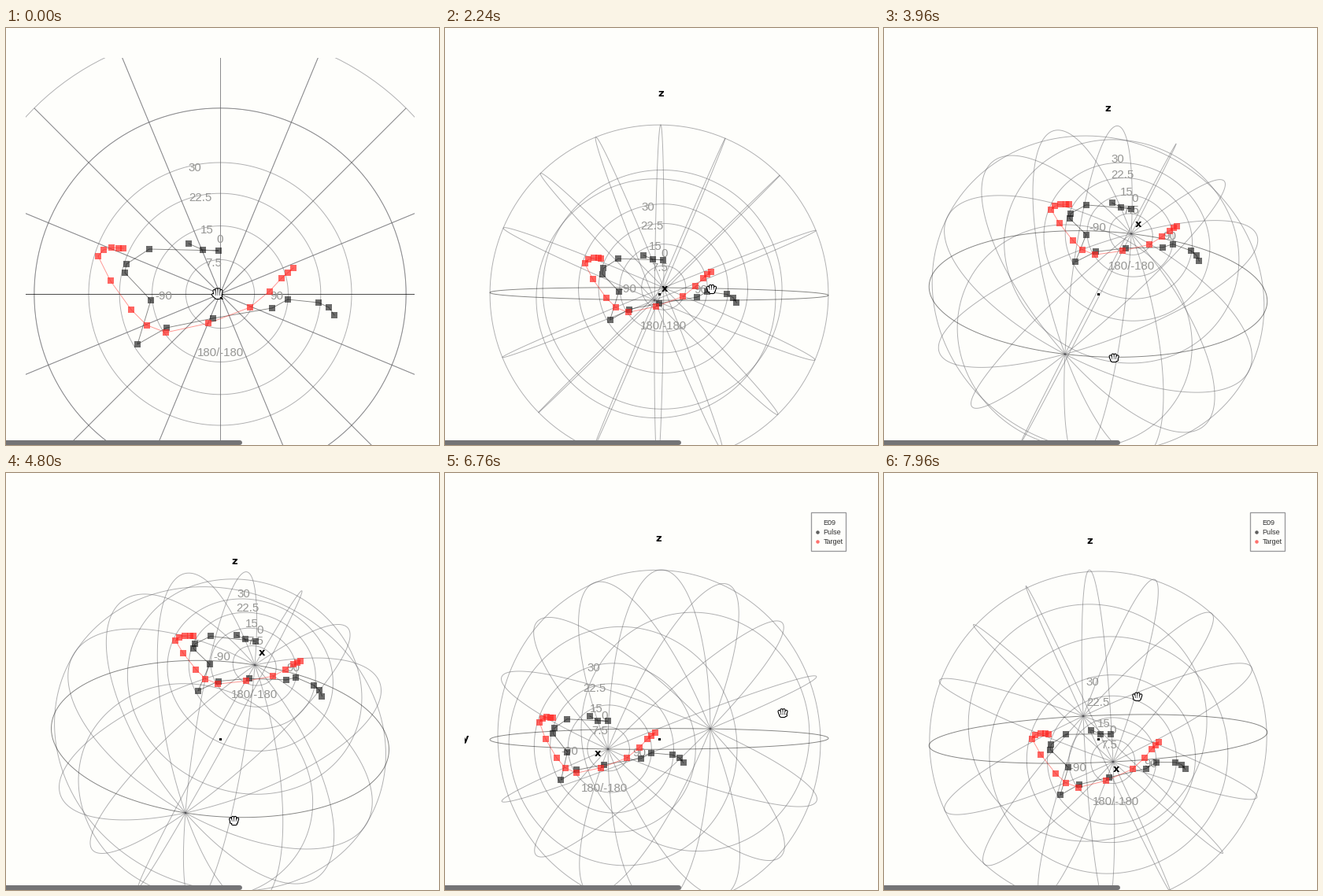
A matplotlib script that plays this animation: 550 px wide and 530 px high, repeating every 8000 ms.

```python
import numpy as np
import matplotlib.pyplot as plt
from matplotlib.animation import FuncAnimation
from matplotlib.collections import LineCollection
from matplotlib.patches import Rectangle

W, H, DPI = 550, 530, 100
STEP, FRAMES = 40, 200
CENTER = np.array([272.0, 338.0])
R_START, R_END = 334, 215
ZOOM_END, GRAB_AT, LEGEND_AT = 840, 1600, 6320
GRAB = np.array([346.0, 321.0])
DRAG = 275          # pointer travel per unit of axis travel
LABEL_R = 1.09      # labels float just above the sphere
PT = 72 / DPI

BG = "#fefefb"
GREY = (0.38, 0.38, 0.40)
INK = (0.04, 0.04, 0.04)
RED = (1.0, 0.15, 0.13)
LABEL = "#969694"

# time, x-axis tip (right, up), lean of the z axis
VIEW = np.array([
    [GRAB_AT, 0, 0, 0],
    [2240, 0.027, 0.037, 0.008],
    [3000, 0.167, 0.181, 0.023],
    [4800, 0.205, 0.437, 0.070],
    [5880, -0.344, 0.205, 0.116],
    [6760, -0.302, -0.060, -0.004],
    [7960, 0.088, -0.135, -0.040],
])

PULSE = [(232, 274), (250, 282), (270, 283), (182, 281), (153, 300),
         (151, 311), (184, 346), (167, 402), (204, 381), (263, 369),
         (338, 356), (358, 345), (397, 349), (410, 355), (417, 365)]
# every second sample; the ones between follow the smooth curve
TARGET = [(149, 280), (134, 279), (117, 290), (159, 358),
          (203, 387), (310, 355), (350, 318), (365, 305)]


def smooth_path(kt, kv, t):
    """Monotone cubic through the rows of kv at times kt."""
    h = np.diff(kt)
    d = np.diff(kv, axis=0) / h[:, None]
    a, b = d[:-1], d[1:]
    same = a * b > 0
    m = np.zeros_like(kv, dtype=float)
    m[1:-1] = np.where(same, 2 * a * b / np.where(same, a + b, 1), 0)
    m[-1] = d[-1]
    t = np.clip(t, kt[0], kt[-1])
    i = np.clip(np.searchsorted(kt, t, side="right") - 1, 0, len(h) - 1)
    s, hi = ((t - kt[i]) / h[i])[:, None], h[i][:, None]
    return ((1 + 2 * s) * (1 - s) ** 2 * kv[i] + s * (1 - s) ** 2 * hi * m[i]
            + s * s * (3 - 2 * s) * kv[i + 1] + s * s * (s - 1) * hi * m[i + 1])


def ease(t, start, end):
    s = np.clip((t - start) / (end - start), 0, 1)
    return s * s * (3 - 2 * s)


def sphere(theta, phi):
    """Unit vector: theta from the x axis, phi clockwise from up (degrees)."""
    th, ph = np.broadcast_arrays(np.radians(theta), np.radians(phi))
    return np.stack([np.cos(th), np.sin(th) * np.sin(ph),
                     np.sin(th) * np.cos(ph)], axis=-1)


def lift(flat, r=1.0):
    """Raise front-view positions (right, up) onto a sphere of radius r."""
    flat = np.atleast_2d(flat)
    depth = np.sqrt(r * r - (flat ** 2).sum(1))
    return np.column_stack([depth, flat])


def on_sphere(pixels):
    return lift((np.array(pixels, float) - CENTER) / [R_START, -R_START])


def basis(xr, xu, zr):
    """Screen right and up directions in sphere coordinates."""
    hr = np.sqrt(1 - xr ** 2 - zr ** 2)
    a = 1 + (zr / hr) ** 2
    b = 2 * xr * xu * zr / hr ** 2
    c = xu ** 2 * (1 + (xr / hr) ** 2) - 1
    zu = (-b + np.sqrt(b * b - 4 * a * c)) / (2 * a)
    return np.array([[xr, hr, zr], [xu, -(xr * xu + zr * zu) / hr, zu]]).T


def project(points, view, radius):
    return CENTER + (points @ view) * [radius, -radius]


def hand_shape(reach, thumb):
    """Strokes of a hand whose middle fingers extend up by reach."""
    strokes = [((x, 0.1 * x * x - reach), (0.8 * x, 1.5))
               for x in (-4.5, -1.5, 1.5, 4.5)]
    strokes += [((y - 6.5, y), (6.5 - y, y)) for y in (3, 4.5)]
    if thumb:
        strokes.append(((-6, 1), (-3, 4)))
    return np.array(strokes)


times = np.arange(FRAMES) * STEP
track = smooth_path(VIEW[:, 0], VIEW[:, 1:], times)
odd_even = np.arange(len(TARGET)) * 2
target = smooth_path(odd_even, np.array(TARGET, float),
                     np.arange(odd_even[-1] + 1))

front, back = np.linspace(0, 90, 50), np.linspace(90, 180, 50)
turn = np.linspace(0, 360, 160)
grid = [sphere(arc, phi) for phi in np.arange(16) * 22.5 if phi % 180 != 90
        for arc in (front, back)]
grid += [sphere(th, turn) for th in (7.5, 15, 22.5, 30, 45, 90, 135)]
equator = [sphere(arc, phi) for phi in (90, 270) for arc in (front, back)]

fig = plt.figure(figsize=(W / DPI, H / DPI), dpi=DPI, facecolor=BG)
ax = fig.add_axes([0, 0, 1, 1])
ax.set_xlim(0, W)
ax.set_ylim(H, 0)
ax.axis("off")
frame_box = Rectangle((25, 38), 494, H - 38, fill=False, lw=0)
ax.add_patch(frame_box)


def clipped(artist):
    artist.set_clip_path(frame_box)
    return artist


def strokes(color, width, z, **kw):
    lc = LineCollection([], colors=[color], linewidths=width * PT,
                        zorder=z, **kw)
    ax.add_collection(lc)
    return lc


def write(s, px, color, **kw):
    return clipped(ax.text(0, 0, s, fontsize=px * PT, color=color, ha="center",
                           va="baseline", clip_on=True, **kw))


grid_lines = clipped(strokes(GREY, 0.95, 1, alpha=0.5))
equator_lines = clipped(strokes(INK, 0.95, 2, alpha=0.5))

series = []
for pixels, color, alpha in ((PULSE, INK, 0.6), (target, RED, 0.7)):
    line, = ax.plot([], [], color=color, lw=0.9 * PT, alpha=0.5, zorder=4)
    dots, = ax.plot([], [], "s", color=color, ms=8 * PT, mew=0,
                    alpha=alpha, zorder=5)
    series.append((on_sphere(pixels), clipped(line), clipped(dots)))

labels = []
scale = [(f"{th:g}", th, -11.25) for th in (7.5, 15, 22.5, 30)]
scale += [(s, 12.45, phi) for s, phi in
          (("0", 0), ("90", 90), ("180/-180", 180), ("-90", -90))]
for s, th, phi in scale:
    text = write(s, 15, LABEL, family="Liberation Sans", zorder=3)
    labels.append((lift(sphere(th, phi)[1:], LABEL_R)[0], text, 7.4))
for s, axis in (("x", (1, 0, 0)), ("y", (0, -1, 0)), ("z", (0, 0, 1))):
    text = write(s, 13, "black", family="DejaVu Sans", weight="bold", zorder=6)
    labels.append((1.2 * np.array(axis), text, 7))

ax.plot(*CENTER, "s", color="black", ms=3 * PT, mew=0, zorder=6)
ax.plot([-6, 297], [527, 527], color="#747476", lw=6 * PT,
        solid_capstyle="round", zorder=8)

legend = [ax.add_patch(Rectangle((465, 49.5), 44, 49.5, facecolor=BG,
                                 edgecolor="#98989a", lw=1.3 * PT, zorder=7))]
for row, (s, color) in enumerate((("E09", None), ("Pulse", INK),
                                  ("Target", RED))):
    y = 62 + 12.5 * row
    legend.append(ax.text(480.5, y + 3.5, s, fontsize=9 * PT, va="baseline",
                          color="#303030", family="Liberation Sans", zorder=8))
    if color:
        legend += ax.plot(473, y, "o", color=color, ms=4.5 * PT, mew=0,
                          alpha=0.65, zorder=8)

hand = [strokes("black", 4.2, 9, capstyle="round"),
        strokes("white", 2.0, 9, capstyle="round")]
open_hand, fist = hand_shape(6, True), hand_shape(3.5, False)


def draw(i):
    t = times[i]
    xr, xu, lean = track[i]
    radius = R_START + (R_END - R_START) * ease(t, STEP, ZOOM_END)
    view = basis(xr, xu, lean)

    grid_lines.set_segments([project(g, view, radius) for g in grid])
    equator_lines.set_segments([project(g, view, radius) for g in equator])
    for pts, line, dots in series:
        p = project(pts, view, radius)
        line.set_data(p[:, 0], p[:, 1])
        dots.set_data(p[:, 0], p[:, 1])
    for pos, text, drop in labels:
        x, y = project(pos, view, radius)
        text.set_position((x, y + drop))
    for part in legend:
        part.set_visible(t >= LEGEND_AT)

    # the sphere turns against the drag
    start = CENTER - [3, 0]
    pointer = start + (GRAB - start) * ease(t, ZOOM_END, GRAB_AT)
    pointer = pointer + np.array([-xr, xu]) * DRAG
    shape = open_hand if t < GRAB_AT else fist
    for lc in hand:
        lc.set_segments(list(shape + pointer))
    return []


anim = FuncAnimation(fig, draw, frames=FRAMES, interval=STEP, repeat=True,
                     repeat_delay=0, blit=False)
plt.show()
```
